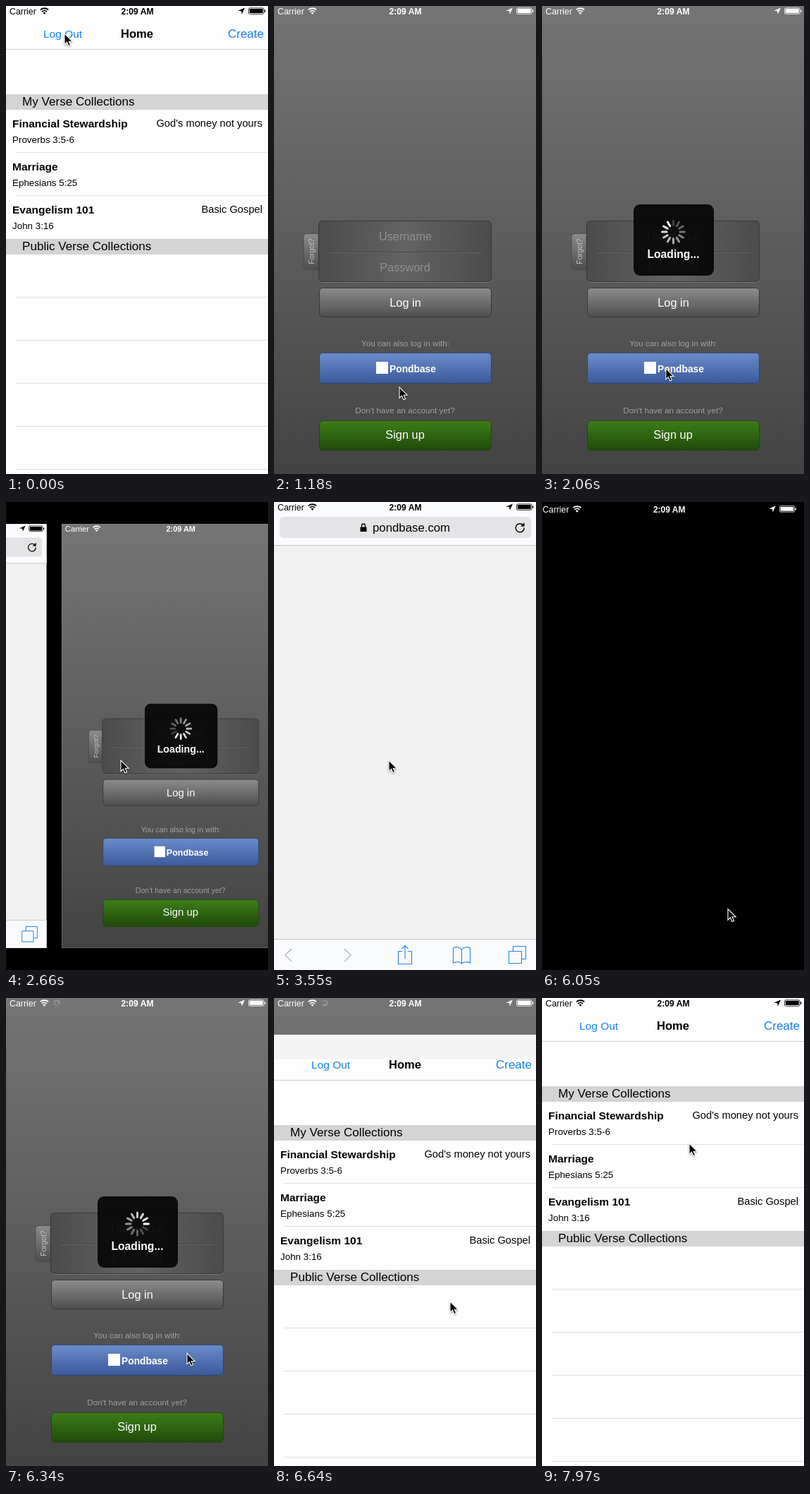
Animation of 372x663 px, one loop 8 s. Source, as an HTML page:

```html
<!DOCTYPE html>
<html lang="en">
<head>
<meta charset="utf-8">
<title>Log in and return</title>
<style>
html, body { margin: 0; height: 100%; overflow: hidden; background: #000; }
svg { display: block; width: 372px; height: 663px; }
text { font-family: "Liberation Sans", Arial, sans-serif; }
.b { font-weight: bold; }
.m { text-anchor: middle; }
.e { text-anchor: end; }
.title { font-size: 15.5px; font-weight: bold; }
.ref { font-size: 13.4px; }
.note { font-size: 14.7px; text-anchor: end; }
.head { font-size: 17.1px; }
.hint { font-size: 11.7px; text-anchor: middle; fill: #a0a0a0; }
.field { font-size: 16.3px; text-anchor: middle; fill: #909090; }
.push { font-size: 16.4px; text-anchor: middle; fill: #fff; }
.line { fill: none; stroke: #2488f0; stroke-width: 1.1; }
</style>
</head>
<body>
<svg viewBox="0 0 372 663">
<defs>
  <linearGradient id="wall" x2="0" y2="1"><stop stop-color="#757575"/><stop offset=".5" stop-color="#5d5d5d"/><stop offset="1" stop-color="#434343"/></linearGradient>
  <linearGradient id="well"><stop stop-color="#4b4b4b"/><stop offset=".5" stop-color="#636363"/><stop offset="1" stop-color="#4b4b4b"/></linearGradient>
  <linearGradient id="gray" x2="0" y2="1"><stop stop-color="#8c8c8c"/><stop offset="1" stop-color="#4e4e4e"/></linearGradient>
  <linearGradient id="blue" x2="0" y2="1"><stop stop-color="#6b8cca"/><stop offset="1" stop-color="#3c599b"/></linearGradient>
  <linearGradient id="green" x2="0" y2="1"><stop stop-color="#3d7d17"/><stop offset="1" stop-color="#204a0a"/></linearGradient>
  <linearGradient id="band" x2="0" y2="1"><stop stop-color="#6d88b8"/><stop offset="1" stop-color="#365590"/></linearGradient>
  <linearGradient id="pale" x2="0" y2="1"><stop stop-color="#fff"/><stop offset="1" stop-color="#f1f2f4"/></linearGradient>
  <g id="status" fill="currentColor">
    <text x="5" y="12" font-size="12.4">Carrier</text>
    <text x="186.5" y="12" font-size="12.1" class="b m">2:09 AM</text>
    <g fill="none" stroke="currentColor" stroke-width="1.8">
      <path d="M48.8 5.4a8.6 8.6 0 0 1 11.4 0M51 8a5.2 5.2 0 0 1 7 0"/>
    </g>
    <path d="M54.5 12l-2-2.3a3 3 0 0 1 4 0zM339 2.5l-4.2 9.2-.7-4.4-4.7-.6z"/>
    <rect x="344.5" y="2.8" width="21.5" height="8.6" rx="1.8" fill="none" stroke="currentColor" stroke-width=".8"/>
    <path d="M345.8 4.1h18.9v6h-18.9zM367 5.5h1.3v3.2h-1.3z"/>
  </g>
</defs>

<g id="app">
  <rect width="372" height="663"/>
  <g id="screens">
    <g id="home">
      <rect width="372" height="663" fill="#fefefe"/>
      <rect y="61" width="372" height="1" fill="#cfcfcf"/>
      <text id="logout" x="53" y="45" font-size="15.5" fill="#1480f5">Log Out</text>
      <text x="186" y="45" font-size="16.6" class="b m">Home</text>
      <text x="366" y="45" font-size="17" class="e" fill="#1480f5">Create</text>
      <path d="M0 125h372v22H0zM0 330h372v22H0z" fill="#d4d4d4"/>
      <text x="23" y="141" class="head">My Verse Collections</text>
      <text x="23" y="346" class="head">Public Verse Collections</text>
      <text x="9" y="172" class="title">Financial Stewardship</text>
      <text x="9" y="194" class="ref">Proverbs 3:5-6</text>
      <text x="364" y="171" class="note">God's money not yours</text>
      <text x="9" y="233" class="title">Marriage</text>
      <text x="9" y="255" class="ref">Ephesians 5:25</text>
      <text x="9" y="294" class="title">Evangelism 101</text>
      <text x="9" y="316" class="ref">John 3:16</text>
      <text x="364" y="293" class="note">Basic Gospel</text>
      <path d="M14 207.5h358m-358 61h358m-358 144h358m-358 61h358m-358 61h358m-358 61h358m-358 61h358" stroke="#dfdfe1"/>
    </g>
    <g id="login">
      <rect width="372" height="663" fill="url(#wall)"/>
      <path d="M63 322.5H47q-5 0-5 5v41q0 5 5 5h16z" fill="url(#gray)" stroke="#474747" stroke-width=".8"/>
      <text transform="translate(57 347.5) rotate(-90)" font-size="10.6" class="m" fill="#c0c0c0">Forgot?</text>
      <rect x="63.5" y="305.5" width="245" height="86" rx="5" fill="none" stroke="#777"/>
      <rect x="63.5" y="304.5" width="245" height="86" rx="5" fill="url(#well)" stroke="#393939"/>
      <path d="M78 348.5h216" stroke="#454545"/>
      <path d="M78 349.5h216" stroke="#686868"/>
      <text x="186.5" y="332" class="field">Username</text>
      <text x="186" y="376" class="field">Password</text>
      <rect x="64.5" y="399.5" width="244" height="41" rx="5" fill="url(#gray)" stroke="#383838"/>
      <text x="186.5" y="426" class="push">Log in</text>
      <text x="186.5" y="482" class="hint">You can also log in with:</text>
      <rect x="64.5" y="491.5" width="244" height="43" rx="5" fill="url(#blue)" stroke="#34466f"/>
      <rect x="145" y="504" width="17" height="17" fill="#fff"/>
      <text x="164" y="519" font-size="13.8" class="b" fill="#fff">Pondbase</text>
      <rect id="pressed" x="64" y="491" width="245" height="44" rx="5" opacity=".35"/>
      <text x="186" y="577" class="hint">Don't have an account yet?</text>
      <rect x="64.5" y="587.5" width="244" height="42" rx="5" fill="url(#green)" stroke="#27421b"/>
      <text x="186" y="613" class="push">Sign up</text>
      <g id="hud">
        <rect x="130" y="281" width="114" height="101" rx="9" opacity=".87"/>
        <g transform="translate(186.5 320)"><g id="wheel" stroke="#fff" stroke-width="3" stroke-linecap="round"></g></g>
        <text x="186.5" y="357" font-size="15.7" class="b m" fill="#fff">Loading...</text>
      </g>
    </g>
    <g id="sheet">
      <rect y="-3" width="372" height="4" fill="#f4f4f4"/>
      <use href="#home"/>
      <rect id="lip" y="-3" width="372" height="35" fill="#f4f4f4"/>
    </g>
  </g>
  <use id="bar" href="#status"/>
  <g id="busy" transform="translate(72 7) scale(.28)" opacity=".6"><use href="#wheel"/></g>
</g>

<g id="safari">
  <rect width="372" height="663" fill="#f1f1f1"/>
  <rect width="372" height="61" fill="#fafbfc"/>
  <rect y="61" width="372" height="1" fill="#c4c4c6"/>
  <use href="#status"/>
  <rect x="8" y="21" width="357" height="30" rx="5" fill="#e4e4e6"/>
  <path d="M122.500 35.500h9v6.500h-9z"/>
  <path d="M124.500 36v-2.500a2.500 2.500 0 0 1 5 0V36" fill="none" stroke="#000" stroke-width="1.300"/>
  <text x="140" y="41.500" font-size="16.800">pondbase.com</text>
  <path d="M353.500 32.500a6 6 0 1 0 1.700 4" fill="none" stroke="#000" stroke-width="1.400"/>
  <path d="M355.500 29v5.500H350z"/>
  <g id="page">
    <rect y="61" width="372" height="558" fill="#fafbfd"/>
    <rect y="61" width="372" height="45" fill="url(#band)"/>
    <path d="M0 61.500h372M0 105.500h372" stroke="#25396a"/>
    <text x="186" y="90" font-size="16.200" class="b m" fill="#fff">Confirm</text>
    <g id="gear" transform="translate(186.500 312.500)" fill="#3a4150">
      <circle r="17.500" fill="none" stroke="#3a4150" stroke-width="11"/>
    </g>
    <text x="186.500" y="380" font-size="14.700" class="m" fill="#31353f">You have already authorized PonderedVerse.</text>
    <rect x="6.500" y="566.500" width="176" height="43" rx="3" fill="url(#pale)" stroke="#a7abb3"/>
    <text x="94.500" y="593" font-size="14.300" class="b m" fill="#4c505a">Cancel</text>
    <rect id="ok" x="191.500" y="566.500" width="175" height="43" rx="3" stroke="#435a8b"/>
    <text x="279" y="593" font-size="14.300" class="b m" fill="#fff">OK</text>
  </g>
  <rect y="619" width="372" height="44" fill="#f9fafb"/>
  <rect y="619" width="372" height="1" fill="#c6c7ca"/>
  <path d="M25 633l-9 9 9 9M100 633l9 9-9 9" fill="none" stroke="#b9bdc5" stroke-width="1.500"/>
  <path class="line" d="M182 636.500h-5.500v18h19v-18H190M186 647v-18.500m-4.500 4.500l4.500-4.500 4.500 4.500"/>
  <path class="line" d="M266.500 634c-3-4-9-4-12-2v21c4-2 9-2 12 1 3-3 8-3 12-1v-21c-3-2-9-2-12 2zv20"/>
  <path class="line" d="M333.500 636.500h18v17h-18zM339.500 636v-6.500h18v18H352"/>
</g>

<path id="cursor" d="M0 0V15.500l3.500-3.300 2.400 5.600 2.700-1.200-2.400-5.400h5z" stroke="#fff" stroke-width="1.100"
  style="filter:drop-shadow(0 1px 1px #0006)"/>
</svg>
<script>
const LOOP = 8000, TICK = 147.6;
const $ = id => document.getElementById(id);
const clamp = v => Math.min(1, Math.max(0, v));
const show = (id, on) => { $(id).style.display = on ? "" : "none"; };
const move = (id, x, y, k = 1) => $(id).setAttribute("transform", `translate(${x} ${y}) scale(${k})`);

const ring = (n, part) => Array.from({ length: n }, (_, i) => part(i, i * 360 / n)).join("");
$("wheel").innerHTML = ring(12, (i, a) =>
  `<path d="M0-9.500V-16" transform="rotate(${a})" opacity="${.2 + .8 * i / 11}"/>`);
$("gear").innerHTML += ring(8, (i, a) =>
  `<path d="M-7.500-20L-4.800-32.800H4.800L7.500-20z" transform="rotate(${a})"/>`);

// time, x, y of the pointer's tip
const track = [
  [0, 83, 39], [300, 83, 39], [1180, 178, 540], [1480, 178, 540],
  [1770, 176, 515], [2060, 176, 515], [2657, 163, 366], [3600, 163, 366],
  [4700, 264, 579], [5500, 264, 579], [6050, 264, 577], [6642, 250, 430],
  [7230, 228, 318], [7970, 209, 206], [8000, 209, 206]
];

function pointer(t) {
  const i = track.findIndex(p => p[0] > t);
  const [a, b] = [track[i - 1], track[i]];
  const p = (t - a[0]) / (b[0] - a[0]);
  return [1, 2].map(j => a[j] + (b[j] - a[j]) * p);
}

// distance still to travel for a screen rising from the bottom
const rise = (t, start) => Math.round(663 * (1 - clamp((t - start) / 523)) ** 3);

function swap(t, start) {
  const p = clamp((t - start) / 560);
  return p * p * (3 - 2 * p);
}

function card(id, slot, k) {
  move(id, 186 + slot * 396 * k - 186 * k, 331.5 * (1 - k), k);
}

function draw(t) {
  const leaving = t < 5000;
  const s = swap(t, leaving ? 2509 : 5532);
  const k = 1 - .183 * Math.sin(Math.PI * s);
  card("app", leaving ? s : s - 1, k);
  card("safari", leaving ? s - 1 : s, k);
  show("safari", t > 2510 && t < 6100);
  show("page", t > 4100);
  $("ok").setAttribute("fill", t > 5100 ? "#465f94" : "#5d76aa");

  $("logout").setAttribute("opacity", t > 140 && t < 1200 ? .2 : 1);
  move("login", 0, rise(t, 370));
  show("pressed", t > 1700 && t < 1900);
  show("hud", t > 1900);
  show("screens", t < 5500 || t > 6150);

  const up = rise(t, 6347);
  move("sheet", 0, up);
  show("sheet", t > 6347);
  show("lip", up > 0);
  $("logout").setAttribute("opacity", t > 140 && t < 1200 ? .2 : 1);

  const white = t > 800 && t < 7375;
  $("bar").setAttribute("color", white ? "#fff" : "#000");
  show("busy", t > 6150 && white);
  $("wheel").setAttribute("transform", `rotate(${Math.floor(t / 83) * 30 % 360})`);
  move("cursor", ...pointer(t));
}

function frame(now) {
  const t = now % LOOP;
  draw(Math.floor((t + 8) / TICK) * TICK);
  requestAnimationFrame(frame);
}
requestAnimationFrame(frame);
</script>
</body>
</html>
```
